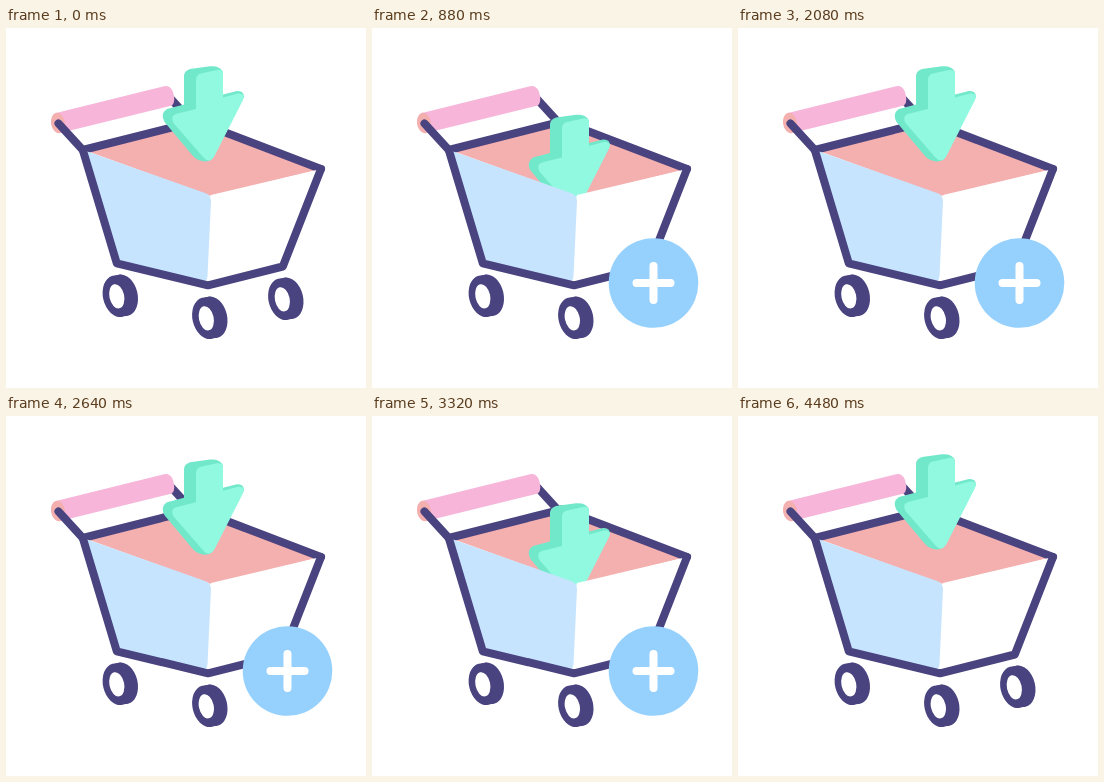
Animation of 360 by 360 pixels, one loop 4.68 s. Source, as an HTML page:

```html
<!DOCTYPE html>
<html lang="en">
<head>
<meta charset="utf-8">
<title>Add to cart</title>
<style>
  html, body { margin: 0; width: 100%; height: 100%; overflow: hidden; background: #fff; }
  svg { display: block; width: 100vw; height: 100vh; }
  .line { fill: none; stroke: #49437f; stroke-width: 8; stroke-linecap: round; stroke-linejoin: round; }
  .dark { fill: #49437f; }
  .white { fill: #fff; }
</style>
</head>
<body>
<svg viewBox="0 0 360 360">
  <defs>
    <g id="wheel">
      <g class="dark">
        <ellipse cx="111.3" cy="268.3" rx="14.3" ry="21" transform="rotate(-13 111.3 268.3)"/>
        <ellipse cx="117.3" cy="267.3" rx="14.3" ry="21" transform="rotate(-13 117.3 267.3)"/>
        <path d="M108.8 247.6L114.8 246.6L119.8 288L113.8 289Z"/>
      </g>
      <ellipse class="white" cx="110.8" cy="268.3" rx="7.4" ry="12.3" transform="rotate(-12 110.8 268.3)"/>
    </g>
  </defs>

  <!-- inside and back of the basket -->
  <path fill="#f4afaf" d="M78 122L190 94L315 141L205 168Z"/>
  <path class="line" d="M165 71L186 94"/>
  <path class="line" d="M76.800 122L190 93.300L315 141"/>

  <g id="arrow">
    <path fill="#72e8cb" d="M178 48Q178 43 184 41L204 38.3Q214 37.5 217 44L217 66.500L231 63Q238 62.500 238 69L206 131Q202 135 194 132.500Q190 131.500 187 128L158.500 94Q154 85.500 161 81L178 76.500Z"/>
    <path fill="#92f9e1" d="M190 52Q190 46.5 195 45.5L211 42Q217 41 217 46L217 69.5L232 65.5Q240 65 237 72L208 129Q203 136 197 129L167.500 95Q164 88 170 86L190 81Z"/>
  </g>

  <!-- front faces -->
  <path class="white" d="M205 167L315 141L277 238L201 257L195 200Z"/>
  <path fill="#c6e4fe" d="M77 122L199 165Q205 167 205 173L201.500 248Q201 255 195 254L111 235Z"/>
  <path fill="#f6b5d9" d="M50 85L158 58.300Q164 57 167 64Q170 74 166 77.500L54 105Z"/>
  <ellipse fill="#f4afaf" cx="52" cy="95" rx="7" ry="10.300" transform="rotate(-10 52 95)"/>
  <path class="line" d="M52.500 95.500L76.800 122L110.800 235.300L202 257.300L276.800 238.500L315 141"/>

  <use href="#wheel"/>
  <use href="#wheel" x="89.500" y="22"/>
  <use href="#wheel" x="165.500" y="3"/>

  <g id="badge">
    <circle r="44.800" fill="#96d1fe"/>
    <path d="M-17 0H17M0 -17V17" fill="none" stroke="#fff" stroke-width="8" stroke-linecap="round"/>
  </g>
</svg>
<script>
  const LOOP = 4680, STEP = 40, LEG = 1000, PITCH = 1160, DROP = 49;
  const arrow = document.getElementById('arrow');
  const badge = document.getElementById('badge');
  const clamp = x => Math.min(1, Math.max(0, x));
  const ease = x => {
    x = clamp(x);
    return x < 0.5 ? 4 * x ** 3 : 1 - 4 * (1 - x) ** 3;
  };

  // Four legs: down with the badge growing, up, down, up with the badge shrinking.
  function draw(time) {
    const t = Math.floor((time % LOOP) / STEP) * STEP;
    const leg = Math.min(3, Math.floor(t / PITCH));
    const p = (t - leg * PITCH) / LEG;
    const y = leg % 2 ? 1 - ease(p + 0.02) : ease(p - 0.02);

    let size = 1;
    if (leg === 0) size = ease(p / 0.86);
    if (leg === 3) size = 1 - ease((p - 0.1) / 0.86);

    arrow.setAttribute('transform', `translate(0 ${DROP * y})`);
    badge.setAttribute('transform', `translate(281.5 255) scale(${size})`);
    badge.style.display = size > 0 ? '' : 'none';
  }

  const start = performance.now();
  function tick() {
    draw(performance.now() - start);
    requestAnimationFrame(tick);
  }
  tick();
</script>
</body>
</html>
```
